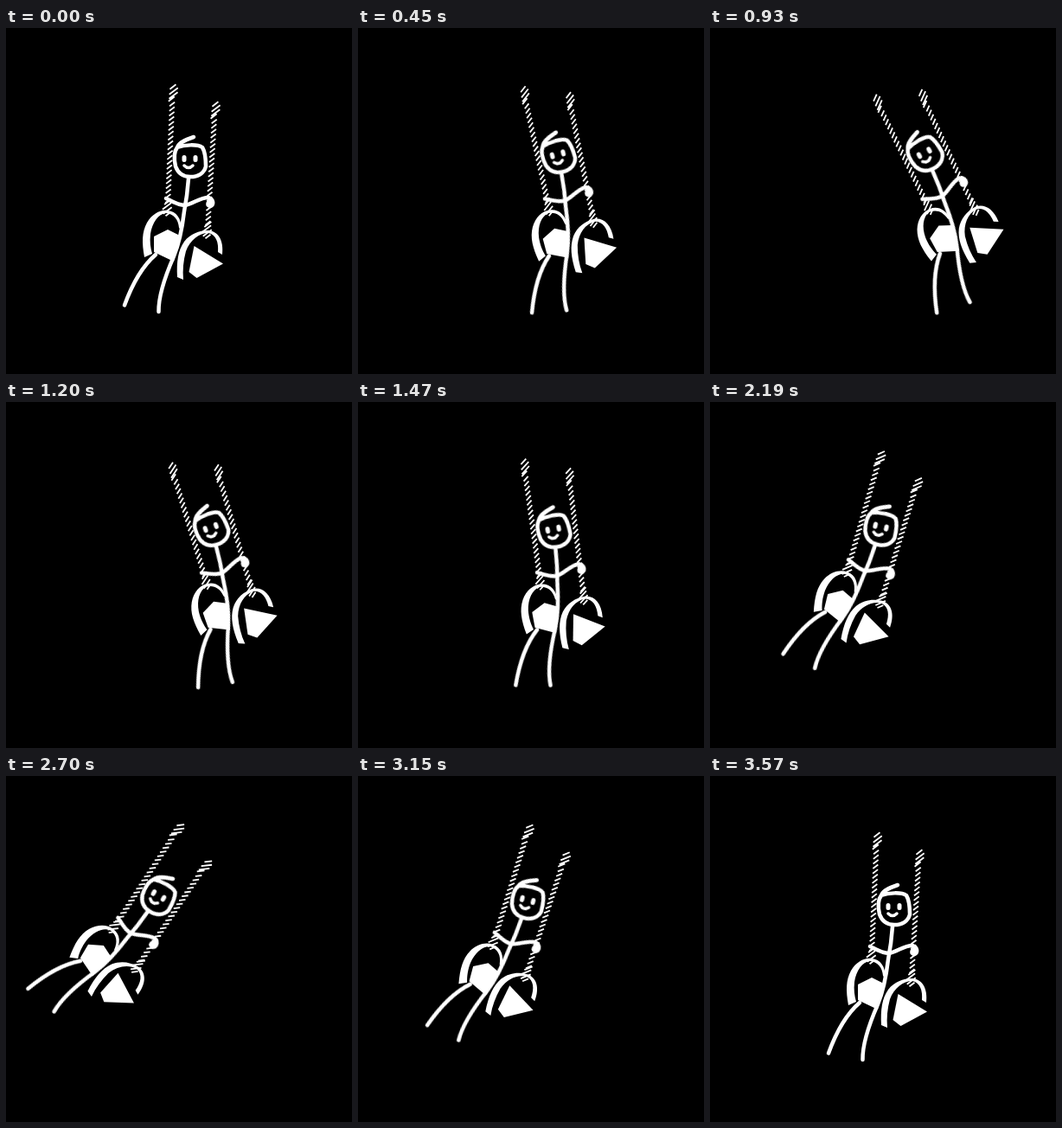
Recreate the animation shown at these times as an HTML page. Size 400x400 px, loop 3.6 s.

```html
<!DOCTYPE html>
<html lang="en">
<head>
<meta charset="utf-8">
<title>Swing</title>
<style>
  html, body { margin: 0; height: 100%; overflow: hidden; background: #000; }
  svg { display: block; width: 100vw; height: 100vh; }
  .line { fill: none; stroke: #fff; stroke-linecap: round; stroke-linejoin: round; }
  #figure { stroke-width: 4.5; filter: blur(.6px); }
  #ropes { stroke-width: 1.8; stroke-linecap: butt; }
</style>
</head>
<body>
<svg viewBox="0 0 400 400">
  <g id="swing">
    <g fill="#fff">
      <path d="M160 265C157 248 157 236 163 225C169 215 178 210 187 211C197 212 203 220 203 234L200 231C199 221 194 215 185 214C176 215 169 225 167 238C166 247 167 254 169 261Z"/>
      <path d="M171 241L187 233L201 240L194 270L171 259Z"/>
      <path d="M198 288C197 270 199 257 206 247C213 238 223 234 234 234C245 235 252 245 250 262L245 259C246 248 243 239 234 237C223 237 213 245 208 258C205 269 204 280 205 291Z"/>
      <path d="M217.500 252L251 272.500L220.500 289L211.500 282Z"/>
    </g>
    <path id="ropes" class="line"/>
    <g id="figure" class="line">
      <path d="M198 138C206 135 221 134 227 138C230 143 231 153 231 160C229 168 222 172 213 172C205 172 199 168 196 160C194 151 194 143 198 138C200 132 208 129 217 126"/>
      <path d="M211 174C210 188 208 202 206 212C204 229 201 247 194 264C187 280 176 306 176.500 328"/>
      <path d="M173 262C158 275 147 293 137 320.500"/>
      <path d="M185 197C191 200 199 205 207 205C217 203 224 196 234 196C240 198 241 205 236 206C232 205 233 200 237 201"/>
      <path d="M206 159Q211 164 216 159" stroke-width="3.500"/>
      <path d="M206 149.500v3M219 149.500v3" stroke-width="5"/>
    </g>
  </g>
</svg>
<script>
const swing = document.getElementById('swing');
const LOOP = 3600, STEP = 30;
const pivot = { x: 218, y: 78.5 };
const arm = { x: -24, y: 118.5 };   // from the pivot to the middle of the drawing
const keys = [[0, 0], [900, -29.5], [2700, 30.5], [3570, 0], [3600, 0]];
const stops = [[0, 0], [900, -29.5], [1800, 0.5], [2700, 30.5], [3570, 0], [3600, 0]];

const dash = (x, y, w) => `M${x - w / 2} ${y + w * .38}L${x + w / 2} ${y - w * .38}`;

// A twisted rope with a few wider strands at both ends.
function rope(x0, y0, x1, y1) {
  const at = (y, w, shift = 0) => dash(x0 + (x1 - x0) * (y - y0) / (y1 - y0) + shift, y, w);
  let d = at(y0 + 1, 7) + at(y0 + 6, 10, 1) + at(y0 + 11, 10, 1) + at(y0 + 15, 7, -1);
  for (let y = y0 + 21; y < y1 - 15; y += 5.6) d += at(y, 6);
  return d + at(y1 - 14, 8) + at(y1 - 9, 10, -1) + at(y1 - 4, 10) + at(y1, 6, 1);
}

// Where the middle of the drawing sits when it hangs at the given angle.
function pose(angle) {
  const a = angle * Math.PI / 180, cos = Math.cos(a), sin = Math.sin(a);
  return {
    angle,
    x: pivot.x + arm.x * cos - arm.y * sin,
    y: pivot.y + arm.x * sin + arm.y * cos
  };
}

// Position and angle both run straight from stop to stop.
function draw() {
  const t = Math.floor(performance.now() % LOOP / STEP) * STEP;
  const i = stops.findIndex(([time]) => time > t);
  const [t0, a0] = stops[i - 1], [t1, a1] = stops[i];
  const from = pose(a0), to = pose(a1);
  const mix = key => from[key] + (to[key] - from[key]) * (t - t0) / (t1 - t0);
  swing.setAttribute('transform',
    `translate(${mix('x')} ${mix('y')}) rotate(${mix('angle')}) ` +
    `translate(${-pivot.x - arm.x} ${-pivot.y - arm.y})`);
  requestAnimationFrame(draw);
}

document.getElementById('ropes').setAttribute('d',
  rope(193, 67, 186.5, 215) + rope(242, 87, 232.5, 241));
draw();
</script>
</body>
</html>
```
